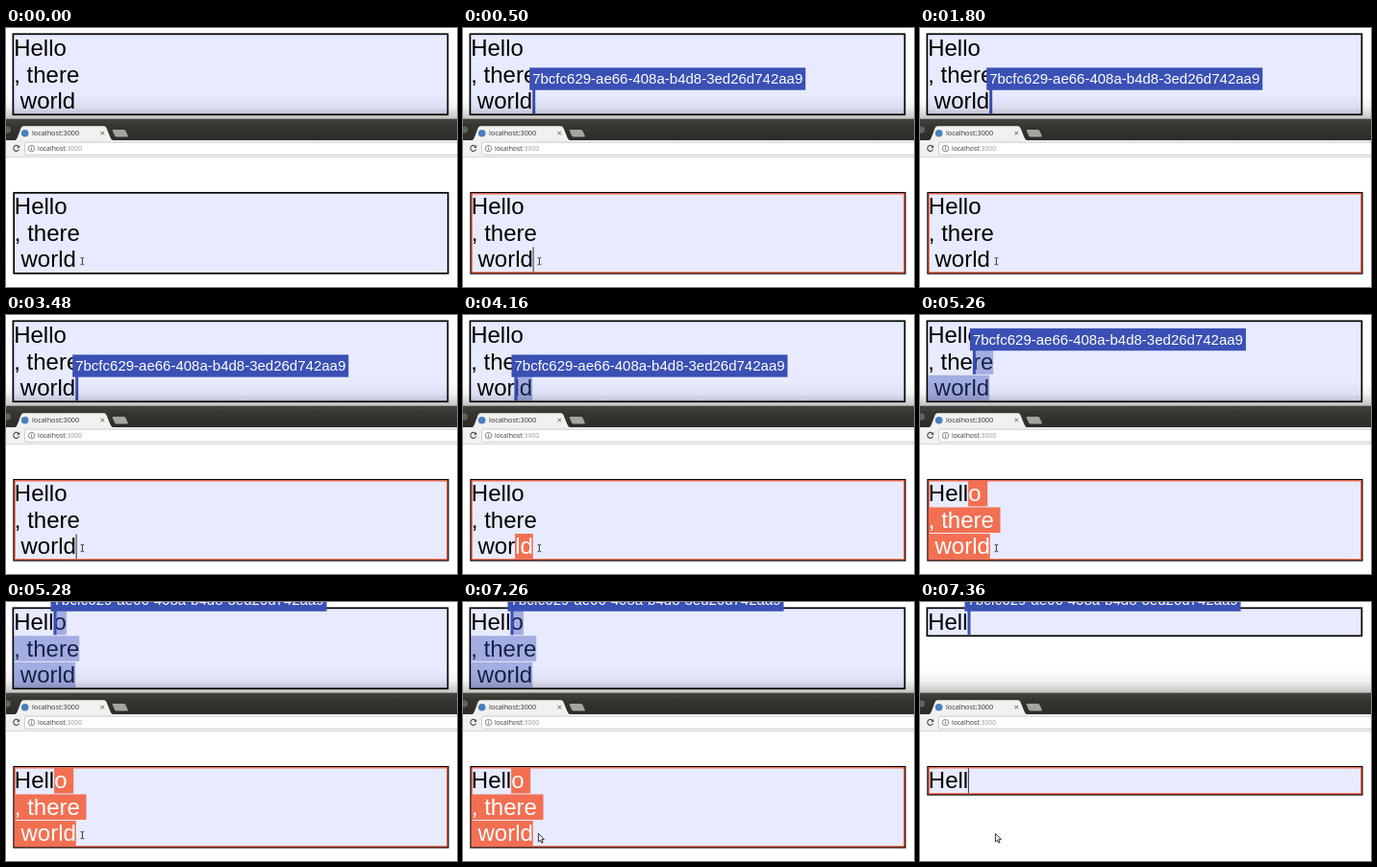
Animation, 469 px wide and 270 px high, one loop 8 s. Source, as an HTML page:

```html
<!DOCTYPE html>
<html lang="en">
<head>
<meta charset="utf-8">
<title>Shared cursor demo</title>
<style>
html, body { margin: 0; width: 100%; height: 100%; overflow: hidden; background: #fff; }
svg { display: block; width: 469px; height: 270px; }
text { white-space: pre; }
.doc { font: 24px "Liberation Sans", Arial, sans-serif; }
.tag { font: 15px "Liberation Sans", Arial, sans-serif; fill: #fff; }
.ui { font-family: "Open Sans", "Noto Sans", sans-serif; fill: #333; }
</style>
</head>
<body>
<svg viewBox="0 0 469 270">
  <defs>
    <linearGradient id="shade" x1="0" y1="0" x2="0" y2="1">
      <stop offset="0" stop-opacity="0"/>
      <stop offset=".5" stop-opacity=".05"/>
      <stop offset="1" stop-opacity=".24"/>
    </linearGradient>
    <linearGradient id="bar" x1="0" y1="0" x2="0" y2="1">
      <stop offset="0" stop-color="#45443f"/>
      <stop offset=".3" stop-color="#373632"/>
      <stop offset="1" stop-color="#2c2b28"/>
    </linearGradient>
  </defs>

  <g id="remote"></g>
  <rect y="69" width="469" height="26" fill="url(#shade)"/>

  <g id="chrome">
    <rect y="94.7" width="469" height="22.5" fill="url(#bar)"/>
    <circle cx="1.5" cy="106" r="4.2" fill="#62615c" stroke="#24231f" stroke-width=".8"/>
    <path d="M8.5 117.5C11 117 11.5 115 12.5 112.5L15.5 104.5Q16.3 102.3 18.5 102.3H101.5Q103.8 102.3 104.6 104.5L108 113Q109.5 117 112 117.5Z" fill="#f2f1f0"/>
    <path d="M111.5 106H122.5Q124 106 124.6 107.4L126.7 112.2Q127.2 113.5 126 113.5H115Q113.5 113.5 113 112.2L110.8 107.2Q110.4 106 111.5 106Z" fill="#a5a49f"/>
    <circle cx="19.7" cy="109.7" r="3.8" fill="#4a7fbd"/>
    <text class="ui" x="27" y="112.3" font-size="7.3">localhost:3000</text>
    <path d="M98.5 107.8l3.6 3.6m0-3.6l-3.6 3.6" stroke="#555" stroke-width=".9"/>
    <rect y="117.2" width="469" height="17.3" fill="#f2f1f0"/>
    <path d="M0 134.5H469" stroke="#d2d1cf" stroke-width=".8"/>
    <rect x="19.5" y="119.2" width="460" height="12.9" rx="1.5" fill="#fff" stroke="#c3c2c0" stroke-width=".8"/>
    <path d="M13.2 123.6A3 3 0 1 0 13.6 126.4" fill="none" stroke="#505050" stroke-width="1.1"/>
    <path d="M14.1 122v3h-3z" fill="#505050"/>
    <circle cx="26.5" cy="125.6" r="3.2" fill="none" stroke="#666" stroke-width=".8"/>
    <path d="M26.5 125.2v2.2m0-3.9v.9" stroke="#666" stroke-width=".9"/>
    <text class="ui" x="33" y="128.2" font-size="6.85">localhost<tspan fill="#999">:3000</tspan></text>
  </g>

  <g id="local"></g>
  <g id="beam" fill="none" stroke="#333" stroke-width="1">
    <path d="M77.6 239.3q1.6 0 1.8 1q.2-1 1.8-1M79.4 240v6M77.6 246.8q1.6 0 1.8-1q.2 1 1.8 1"/>
  </g>
  <path id="arrow" d="M78.4 241.2V250L80.4 248.2L81.8 251.1L83.1 250.5L81.8 247.6H84.4Z" fill="#fff" stroke="#222" stroke-width=".9"/>
</svg>
<script>
const LOOP = 8000, PITCH = 27.5, GLYPHS = 26.5;
const INDIGO = "#3a50b4", ORANGE = "#f26f52", PAPER = "#e8ebff";
const FULL = ["Hello", ", there", "\u00a0world"], SHORT = ["Hell"];
const WIDTHS = [54.7, 68, 64];
const ID = "7bcfc629-ae66-408a-b4d8-3ed26d742aa9";
const NEWLINE = 6.7;

// Caret positions: line, character, pixel offset from the line start
const at = (line, char, x) => ({ line, char, x });
const END = at(2, 6, 64), D = at(2, 5, 50.7), LD = at(2, 4, 45.3);
const RE = at(1, 5, 46.7), O = at(0, 4, 41.3);

const scenes = [
  { t: 0 },
  { t: 500, top: END, low: END, caret: true },
  { t: 1800, top: END, low: END },
  { t: 3480, top: END, low: END, caret: true },
  { t: 3760, top: D, low: D },
  { t: 4160, top: LD, low: LD },
  { t: 4880, top: RE, low: RE },
  { t: 5260, top: RE, low: O },
  { t: 5280, top: O, low: O },
  { t: 7260, top: O, low: O, arrow: true },
  { t: 7360, top: O, low: O, caret: true, arrow: true, cut: true }
];

const $ = id => document.getElementById(id);
const rect = (x, y, w, h, fill, extra = "") =>
  `<rect x="${x}" y="${y}" width="${w}" height="${h}" fill="${fill}" ${extra}/>`;
const frame = (x, y, w, h, color, width, fill = "none") =>
  rect(x, y, w, h, fill, `stroke="${color}" stroke-width="${width}"`);

// Selection runs from the caret to the end of the text
function selection(from, x, y, color, tail, extra) {
  return WIDTHS.map((w, i) => {
    if (i < from.line) return "";
    const start = i === from.line ? from.x : 0;
    const end = w + (i < 2 ? tail : 0);
    return end > start ? rect(x + start, y + i * PITCH, end - start, GLYPHS, color, extra) : "";
  }).join("");
}

function lines(list, x, y, from) {
  return list.map((s, i) => {
    const cut = !from || i < from.line ? s.length : i === from.line ? from.char : 0;
    return `<text class="doc" x="${x}" y="${y + 21.2 + i * PITCH}">${s.slice(0, cut)}` +
      `<tspan fill="#fff">${s.slice(cut)}</tspan></text>`;
  }).join("");
}

function remote({ top, cut }) {
  const x = 8.2, y = 7.8;
  let out = frame(7.4, 6.3, 452, cut ? 29 : 84, "#000", 1.7, PAPER);
  out += lines(cut ? SHORT : FULL, x, y);
  if (!top) return out;
  if (!cut) out += selection(top, x, y, INDIGO, 0, 'opacity=".4"');
  const cx = x + top.x, cy = y + top.line * PITCH;
  return out + rect(cx, cy, 3, GLYPHS, INDIGO) +
    rect(cx - 3, cy - 21.4, 287, 23.3, INDIGO) +
    `<text class="tag" x="${cx}" y="${cy - 4.4}">${ID}</text>`;
}

function local({ low, caret, cut }) {
  const x = 8.8, y = 173, h = cut ? 29 : 84;
  let out = frame(8.2, 171.8, 451.5, h, "#000", 1.7, PAPER);
  if (low) out += frame(9.2, 172.8, 449.5, h - 2, ORANGE, 1.4);
  if (low && !cut) out += selection(low, x, y, ORANGE, NEWLINE, "");
  out += lines(cut ? SHORT : FULL, x, y, cut ? null : low);
  if (caret) out += rect(x + low.x - .2, y + low.line * PITCH + .3, 1, 26, "#333");
  return out;
}

let shown;
function draw(ms) {
  const scene = scenes.findLast(s => s.t <= ms);
  if (scene === shown) return;
  shown = scene;
  $("remote").innerHTML = remote(scene);
  $("local").innerHTML = local(scene);
  $("beam").style.display = scene.arrow ? "none" : "";
  $("arrow").style.display = scene.arrow ? "" : "none";
}

const began = performance.now();
function tick() {
  draw((performance.now() - began) % LOOP);
  requestAnimationFrame(tick);
}
tick();
</script>
</body>
</html>
```
